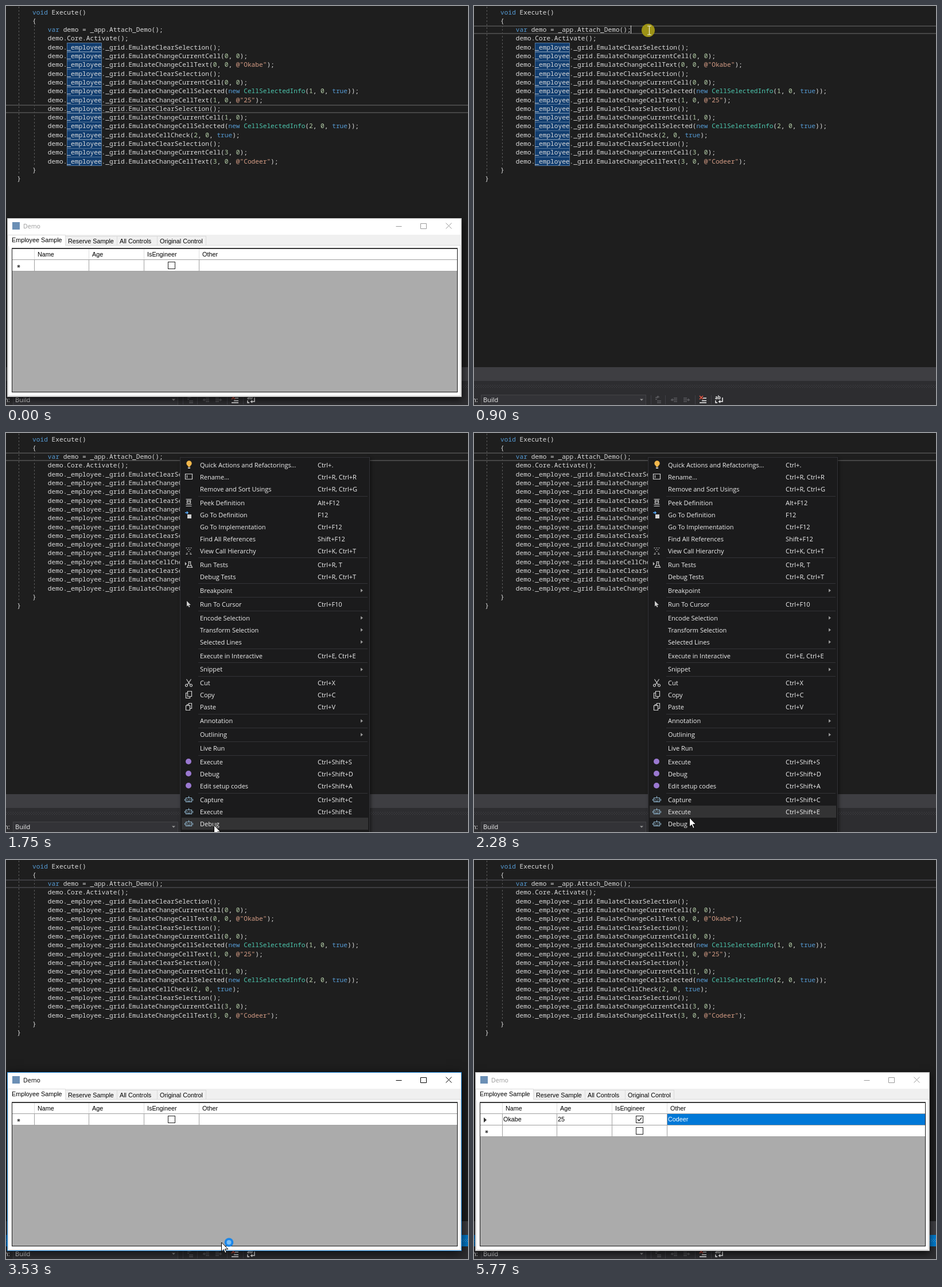
Recreate the animation shown at these times as an HTML page with a canvas. Size 805 by 696 pixels, loop 5850 ms.

```html
<!DOCTYPE html>
<html lang="en">
<head>
<meta charset="utf-8">
<title>Code execution demo</title>
<style>
html, body { margin: 0; width: 100%; height: 100%; overflow: hidden; background: #1e1e1e; }
canvas { display: block; }
</style>
</head>
<body>
<canvas id="stage" width="805" height="696"></canvas>
<script>
const ctx = document.getElementById('stage').getContext('2d');
const LOOP = 5850;
const MONO = '11.16px "Noto Sans Mono", monospace';
const UI = '11px "Open Sans", sans-serif';
const FORM = '10.8px "Liberation Sans", sans-serif';

const code = `    void Execute()
    {
        var demo = _app.Attach_Demo();
        demo.Core.Activate();
        demo._employee._grid.EmulateClearSelection();
        demo._employee._grid.EmulateChangeCurrentCell(0, 0);
        demo._employee._grid.EmulateChangeCellText(0, 0, @"Okabe");
        demo._employee._grid.EmulateClearSelection();
        demo._employee._grid.EmulateChangeCurrentCell(0, 0);
        demo._employee._grid.EmulateChangeCellSelected(new CellSelectedInfo(1, 0, true));
        demo._employee._grid.EmulateChangeCellText(1, 0, @"25");
        demo._employee._grid.EmulateClearSelection();
        demo._employee._grid.EmulateChangeCurrentCell(1, 0);
        demo._employee._grid.EmulateChangeCellSelected(new CellSelectedInfo(2, 0, true));
        demo._employee._grid.EmulateCellCheck(2, 0, true);
        demo._employee._grid.EmulateClearSelection();
        demo._employee._grid.EmulateChangeCurrentCell(3, 0);
        demo._employee._grid.EmulateChangeCellText(3, 0, @"Codeer");
    }
}`.split('\n');

// "-" starts a new group, ">" marks a submenu
const menu = `Quick Actions and Refactorings...|Ctrl+.
Rename...|Ctrl+R, Ctrl+R
Remove and Sort Usings|Ctrl+R, Ctrl+G
-Peek Definition|Alt+F12
Go To Definition|F12
Go To Implementation|Ctrl+F12
Find All References|Shift+F12
View Call Hierarchy|Ctrl+K, Ctrl+T
-Run Tests|Ctrl+R, T
Debug Tests|Ctrl+R, Ctrl+T
-Breakpoint|>
-Run To Cursor|Ctrl+F10
-Encode Selection|>
Transform Selection|>
Selected Lines|>
-Execute in Interactive|Ctrl+E, Ctrl+E
-Snippet|>
-Cut|Ctrl+X
Copy|Ctrl+C
Paste|Ctrl+V
-Annotation|>
-Outlining|>
-Live Run|
-Execute|Ctrl+Shift+S
Debug|Ctrl+Shift+D
Edit setup codes|Ctrl+Shift+A
-Capture|Ctrl+Shift+C
Execute|Ctrl+Shift+E
Debug|`.split('\n').map(row => {
  const split = row[0] === '-';
  const [label, keys] = row.slice(split ? 1 : 0).split('|');
  return { label, keys, split };
});
let rowY = 56;
menu.forEach((m, i) => { if (i) rowY += m.split ? 23.92 : 21; m.y = rowY; });

const ROBOT = 'M-5-3h10v7h-10zM-7-1v3M7-1v3M0-6v3M-3 0h2M1 0h2M-3 2.5h6';
const icons = {
  1: 'M-6-5h12v9h-12zM-3-3v5',
  3: 'M-5-6h10M-3-4h6v5h-6zM-5 3h10M-5 6h10M-3-2h6',
  7: 'M-5-5h2M-1-5h2M3-5h2M-3-2h2M1-2h2M-1 1h2M-4 4h2M2 4h2M-5 6h3M2 6h3',
  8: 'M-6-4v5M-4-2l-2 2M-1-5h5M0-5v4l-3 6h9l-3-6v-4M-1 2h5',
  17: 'M-4-6l6 9M4-6l-6 9M-5 3a2 2 0 1 0 3 2a2 2 0 0 0-3-2M5 3a2 2 0 1 1-3 2a2 2 0 0 1 3-2',
  18: 'M-2-6h7v9h-7zM-2-3h-3v9h7v-3',
  19: 'M-5-2h7v8h-7zM0-2v-4h5v9h-3M-3-2v-2h3'
};

const ARROW = 'M0 0v16l3.7-3.5 2.6 6 2.4-1-2.6-5.8h5.2z';
const SMALL_ARROW = 'M-3-6v9.5l2.2-2 1.6 3.5 1.6-.7-1.6-3.4h3.2z';
const IBEAM = 'M-3.5-7.5h3l.5 1 .5-1h3M0-7v14M-3.5 7.5h3l.5-1 .5 1h3';

// [time, x, y]; the pointer jumps from one place to the next
const track = [
  [70, 663, 569], [150, 560, 420], [220, 440, 230], [300, 340, 100], [370, 272, 42],
  [450, 256, 25], [520, 296, 24], [670, 300, 33], [750, 305, 42],
  [1290, 304, 70], [1370, 312, 300], [1440, 324, 581], [1510, 335, 622], [1590, 345, 652],
  [1670, 354, 670], [1750, 362, 684], [1900, 366, 682], [1980, 370, 679], [2060, 373, 676],
  [2140, 375, 673], [2280, 375, 671], [2370, 375, 669], [2450, 375, 667],
  [4850, 394, 648], [4930, 425, 625], [5000, 470, 613], [5080, 530, 615],
  [5160, 590, 630], [5240, 645, 650], [5310, 685, 674], [5390, 704, 700]
];

function rect(x, y, w, h, color) {
  ctx.fillStyle = color;
  ctx.fillRect(x, y, w, h);
}
function box(x, y, w, h, color) {
  ctx.strokeStyle = color;
  ctx.lineWidth = 1;
  ctx.strokeRect(x + .5, y + .5, w - 1, h - 1);
}
function text(s, x, y, color, font) {
  ctx.font = font;
  ctx.fillStyle = color;
  ctx.fillText(s, x, y);
}
function path(d, x, y, stroke, fill, width = 1) {
  const p = new Path2D(d);
  ctx.save();
  ctx.translate(x, y);
  ctx.lineWidth = width;
  if (fill) { ctx.fillStyle = fill; ctx.fill(p); }
  if (stroke) { ctx.strokeStyle = stroke; ctx.stroke(p); }
  ctx.restore();
}
function disc(x, y, r, color) {
  ctx.fillStyle = color;
  ctx.beginPath();
  ctx.arc(x, y, r, 0, 7);
  ctx.fill();
}

const lineY = i => 10.5 + 15.3 * i;

function tokenColor(s) {
  if (/^(void|var|new|true)$/.test(s)) return '#569cd6';
  if (s === 'CellSelectedInfo') return '#4ec9b0';
  if (s[0] === '@') return '#d69d85';
  return /^\d/.test(s) ? '#b5cea8' : '#dcdcdc';
}

function drawEditor(t) {
  rect(0, 0, 805, 696, '#1e1e1e');
  ctx.setLineDash([3, 3]);
  path('M22.5 1V293M49.5 34V278', 0, 0, '#5c5c5c');
  ctx.setLineDash([]);

  const current = Math.round(lineY(t < 900 ? 11 : 2));
  const edge = t < 3380 ? '#464646' : '#3c3c40';
  rect(0, current - 7, 805, 2, edge);
  rect(0, current + 6, 805, 2, edge);

  ctx.font = MONO;
  const cw = ctx.measureText('0').width;
  code.forEach((line, i) => {
    const y = lineY(i), at = line.indexOf('_employee');
    if (t < 980 && at > 0) {
      const x = Math.round(19.3 + at * cw), top = Math.round(y - 7.5);
      rect(x, top, 61, 16, '#113d6f');
      box(x, top, 61, 16, '#56779b');
    }
    for (const m of line.matchAll(/@"\w+"|\w+|[^\w\s@]+/g))
      text(m[0], 19.3 + m.index * cw, Math.round(y + 4), tokenColor(m[0]), MONO);
  });
  if (t >= 900 && t < 1040 || t >= 2920 && t < 3380) rect(273, 34, 1, 14, '#dcdcdc');
}

function drawOutput(t) {
  const on = t >= 3380;
  rect(0, 630, 805, 24, '#3e3e42');
  rect(0, 654, 805, 42, '#2d2d30');
  if (on) rect(0, 654, 805, 20, '#007acc');
  ctx.setLineDash([1, 3]);
  const dots = on ? '#59a8de' : '#46464a';
  path('M0 661.5H805M0 665.5H805', 0, 0, dots);
  path('M2 663.5H805', 0, 0, dots);
  ctx.setLineDash([]);

  text('n:', -3, 691, '#f1f1f1', UI);
  rect(12, 678, 288, 18, '#333337');
  box(12, 678, 288, 19, '#434346');
  text('Build', 16, 691, '#f1f1f1', UI);
  path('M-3-1.5h6l-3 3z', 292, 687, null, '#999999');
  path('M308.5 679V695M333.5 679V695M385.5 679V695M413.5 679V695', 0, 0, '#3f3f46');
  path('M-5-4h5M-5-1h3M-2 2h7M-2 5h7M2-5h-4l2-2', 321, 687, '#5a5a5e', null, 1.5);
  path('M-1-3h6M-1 0h6M-1 3h6M-1 0h-4l2-2M-5 0l2 2', 349, 687, '#5a5a5e', null, 1.5);
  path('M-5-3h6M-5 0h6M-5 3h6M1 0h4l-2-2M5 0l-2 2', 370, 687, '#5a5a5e', null, 1.5);
  path('M0-3h6M-2 1.5h8M-6 5h12', 399, 687, '#f1f1f1', null, 1.5);
  path('M-6-7l6 6M0-7l-6 6', 399, 687, '#e05340', null, 1.7);
  text('ab', 420, 686, '#f1f1f1', 'bold 8px "Open Sans", sans-serif');
  path('M6-4v7h-6l2-2M0 3l2 2M-6 1v4h3', 427, 687, '#f1f1f1', null, 1.5);
}

function drawMenu(pointerY) {
  ctx.save();
  ctx.shadowColor = 'rgba(0,0,0,.5)';
  ctx.shadowBlur = 5;
  ctx.shadowOffsetX = ctx.shadowOffsetY = 2;
  rect(303, 42, 331, 664, '#1b1b1c');
  ctx.restore();
  box(303, 42, 331, 664, '#333337');

  menu.forEach(({ label, keys, split, y }, i) => {
    if (split) rect(335, Math.round(y - 12.4), 295, 1, '#333337');
    if (Math.abs(pointerY - y) < 10.5) rect(306, Math.round(y - 10.5), 325, 21, '#333334');
    const base = Math.round(y + 4);
    text(label, 338, base, '#f1f1f1', UI);
    if (keys === '>') path('M-2-3l4 3-4 3z', 620, y, null, '#999999');
    else text(keys, 543, base, '#f1f1f1', UI);
    if (icons[i]) path(icons[i], 318.5, Math.round(y) - .5, '#d0d0d0', null, 1.2);
    if (i > 22 && i < 26) disc(318, y - 1, 5, '#9a78d0');
    if (i > 25) path(ROBOT, 318.5, Math.round(y) - .5, '#8fb4cc', null, 1.2);
  });

  disc(319, 53, 4.7, '#f2b74b');
  rect(317, 57, 4, 2, '#f2b74b');
  rect(317, 60, 4, 2, '#d0d0d0');
  path('M-6-4h5M-3-6l2 2-2 2', 318, 143, '#55aaff', null, 1.6);
  rect(316, 142, 7, 7, '#d0d0d0');
  path(SMALL_ARROW, 318, 299, null, '#d0d0d0');
}

function checkbox(y, checked) {
  rect(282, y, 13, 13, '#ffffff');
  box(282, y, 13, 13, '#222222');
  if (checked) path('M285 6l2.5 3L292 3.5', 0, y, '#222222', null, 1.4);
}

function drawGrid(t) {
  const step = t < 3840 ? 0 : Math.min(5, 1 + Math.floor((t - 3840) / 77));
  const cols = [49, 144, 240, 336, 786];
  rect(10, 422, 777, 252, '#ababab');
  rect(11, 424, 775, 18, '#ffffff');
  ['Name', 'Age', 'IsEngineer', 'Other'].forEach((s, i) => {
    rect(cols[i], 424, 1, 18, '#dedede');
    text(s, cols[i] + 6, 437, '#000000', FORM);
  });
  rect(11, 442, 775, 1, '#a0a0a0');

  const rows = step ? 2 : 1;
  for (let r = 0; r < rows; r++) {
    const y = 443 + 20 * r;
    rect(11, y, 775, 19, '#ffffff');
    rect(11, y + 19, 775, 1, '#a0a0a0');
    for (let i = 0; i < 4; i++) rect(cols[i], y, 1, 20, '#a0a0a0');
  }

  if (step) {
    const picked = Math.min(step - 1, 3);
    rect(cols[picked] + 1, 443, cols[picked + 1] - cols[picked] - 1, 19, '#0078d7');
    ['Okabe', step > 1 ? '25' : '', '', step > 4 ? 'Codeer' : ''].forEach((s, i) =>
      text(s, cols[i] + 2, 456, i === picked ? '#ffffff' : '#000000', FORM));
    path('M0-4.5l5 4.5-5 4.5z', 17, 453.5, null, '#333333');
  }
  checkbox(446, step > 2);
  if (step) checkbox(466, false);
  path('M-2.5 0h5M0-2.5v5M-2-2l4 4M2-2l-4 4', 22, step ? 474 : 454, '#333333');
  box(10, 422, 777, 252, '#1a1a1a');
  rect(10, 423, 777, 1, '#555555');
}

function drawWindow(t) {
  const active = t >= 3530 && t < 5770;
  const ink = active ? '#000000' : '#999999';
  ctx.save();
  ctx.shadowColor = 'rgba(0,0,0,.75)';
  ctx.shadowBlur = active ? 18 : 12;
  ctx.shadowOffsetY = 4;
  rect(2, 370, 792, 312, '#f0f0f0');
  ctx.restore();
  rect(3, 371, 790, 28, '#ffffff');
  rect(11, 377, 13, 13, '#6b8fb5');
  text('Demo', 30, 388, ink, '10.6px "Open Sans", sans-serif');
  path('M679.5 384.5h10M722.5 379.5h10v9h-10zM766.5 378.5l10 10M776.5 378.5l-10 10', 0, 0, ink);

  rect(4, 417, 788, 263, '#ffffff');
  box(4, 417, 788, 263, '#dcdcdc');
  [[103, 91, 'Reserve Sample'], [193, 71, 'All Controls'], [263, 86, 'Original Control']]
    .forEach(([x, w, s]) => {
      box(x, 401, w, 17, '#d9d9d9');
      text(s, x + 5, 414, '#000000', FORM);
    });
  rect(4, 399, 99, 20, '#ffffff');
  box(3, 399, 101, 19, '#dcdcdc');
  rect(4, 417, 99, 2, '#ffffff');
  text('Employee Sample', 10, 412, '#000000', FORM);
  drawGrid(t);
  box(2, 370, 792, 312, active ? '#1883d7' : '#b4b4b4');
}

function drawPointer(t, x, y) {
  if (t >= 900 && t < 980) disc(303.5, 42.5, 11.5, '#9c9216');
  if (t >= 2750 && t < 2920) disc(375.5, 667.5, 11.5, 'rgba(190,178,10,.85)');
  if (y < 370 && t < 1040) {
    path(IBEAM, x + .5, y + .5, '#f0eed8', null, 1.2);
    return;
  }
  path(ARROW, x + .5, y, '#000000', '#ffffff');
  if (t >= 3530 && t < 3610) {
    disc(388.5, 667, 7.8, '#1b86e8');
    disc(388.5, 667, 4, '#79bdf5');
  }
}

function frame(now) {
  const t = now % LOOP;
  const spot = track.filter(p => p[0] <= t).pop();
  drawEditor(t);
  drawOutput(t);
  if (t < 900 || t >= 3530) drawWindow(t);
  if (t >= 1040 && t < 2920) drawMenu(t < 1290 ? 0 : spot[2]);
  if (spot) drawPointer(t, spot[1], spot[2]);
  requestAnimationFrame(frame);
}
requestAnimationFrame(frame);
</script>
</body>
</html>
```
